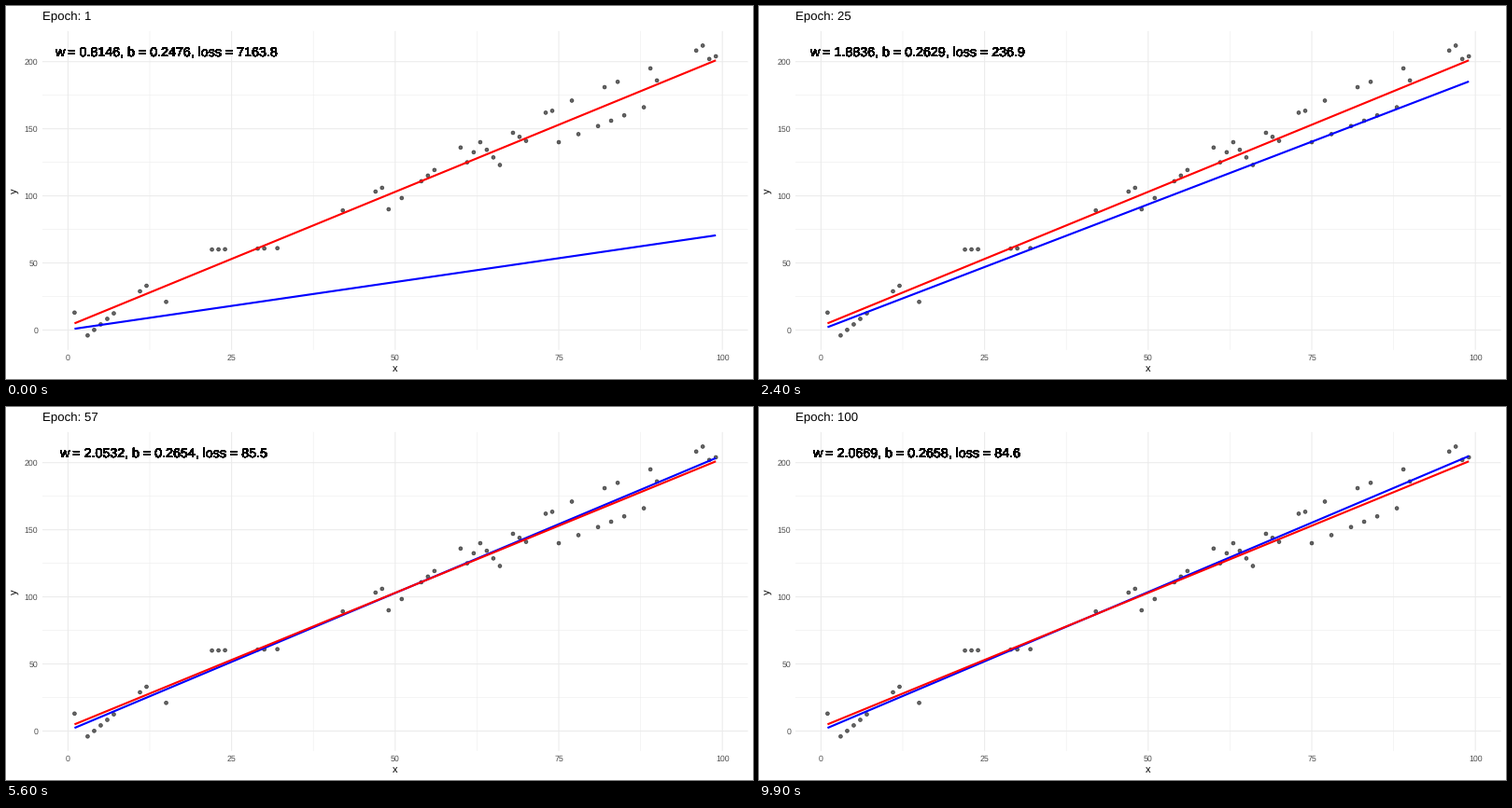
A matplotlib script for the animation above (10000 ms loop, 800 px wide and 400 px high).

```python
import numpy as np
import matplotlib.pyplot as plt
from matplotlib.animation import FuncAnimation
from matplotlib.patches import Circle

EPOCHS = 100
RATE = 1e-5
BEST_W, BEST_B, MIN_LOSS = 2.05466, 1.1632, 84.381  # least-squares optimum
PT = 0.72  # points per pixel at 100 dpi
LEFT, RIGHT, TOP, BOTTOM = 39.0, 794.5, 26.9, 368.8

X = np.r_[1, 3:8, 11:13, 15, 22:25, 29:31, 32, 42, 47:50, 51, 54:57, 60:67,
          68:71, 73:76, 77:79, 81:86, 88:91, 96:100]


def px(x):
    return 66.4 + 7.008 * x


def py(y):
    return 347.5 - 1.439 * y


def true_line(x):
    return 2 * x + 3


def noise(x):
    """Slow swings from key points, then a tight zigzag near the right end."""
    at, swing = zip((1, 8), (3, -13), (12, 6), (15, -12), (22, 13), (32, -6),
                    (48, 7), (49, -11), (60, 13), (61, 0), (63, 11),
                    (66, -12), (68, 8), (70, -2), (73, 13), (90, 3),
                    (97, 15), (98, 3))
    zigzag = np.where(np.isin(x % 5, (2, 4)), 14, -13)
    return np.where((x >= 75) & (x < 90), zigzag, np.interp(x, at, swing))


def descend(w, b):
    """Gradient descent on squared error; one entry per epoch."""
    steps = []
    for _ in range(EPOCHS):
        gap = (BEST_W - w) * X + (BEST_B - b)
        line = (w, b)
        w += 2 * RATE * np.mean(gap * X)
        b += 2 * RATE * np.mean(gap)
        steps.append((line, w, b, MIN_LOSS + np.mean(gap ** 2)))
    return steps


steps = descend(0.71033, 0.24612)
ends = np.array([X[0], X[-1]])

plt.rcParams["font.family"] = "Liberation Sans"
plt.rcParams["text.hinting"] = "no_hinting"
fig = plt.figure(figsize=(8, 4), dpi=100, facecolor="white")
ax = fig.add_axes([0, 0, 1, 1])
ax.set_xlim(0, 800)
ax.set_ylim(400, 0)
ax.axis("off")


def stroke(xs, ys, color, width, z):
    return ax.plot(xs, ys, color=color, lw=width * PT, zorder=z, snap=False,
                   solid_capstyle="butt")[0]


def label(x, y, text, size, color="black", ha="left", **kw):
    return ax.text(x, y, text, fontsize=size * PT, color=color, ha=ha,
                   va="baseline", zorder=6, **kw)


def grid(xs, ys, width, z):
    for x in xs:
        stroke([px(x)] * 2, [TOP, BOTTOM], "#ebebeb", width, z)
    for y in ys:
        stroke([LEFT, RIGHT], [py(y)] * 2, "#ebebeb", width, z)


x_ticks = range(0, 101, 25)
y_ticks = range(0, 201, 50)
grid(np.arange(12.5, 100, 25), range(25, 200, 50), 0.53, 0)
grid(x_ticks, y_ticks, 1.07, 1)

for v in x_ticks:
    label(px(v), 380.4, str(v), 8.8, "#4d4d4d", "center")
for v in y_ticks:
    label(34.2, py(v) + 3.2, str(v), 8.8, "#4d4d4d", "right")
label((LEFT + RIGHT) / 2, 391.5, "x", 11, ha="center")
label(12.3, (TOP + BOTTOM) / 2 + 0.6, "y", 11, ha="center", rotation=90,
      rotation_mode="anchor")

# Fill and outline are both translucent, so their overlap is darker.
shade = (0, 0, 0, 0.6)
for x, y in zip(X, true_line(X) + noise(X)):
    ax.add_patch(Circle((px(x), py(y)), 1.95, fc=shade, ec=shade,
                        lw=0.71 * PT, zorder=2))

fit = stroke(px(ends), py(ends), "#0000ff", 2.13, 3)
stroke(px(ends), py(true_line(ends)), "#ff0000", 2.13, 4)

title = label(LEFT, 15.2, "", 13.2)
# One copy per data point: the stacked antialiasing thickens the glyphs.
notes = [label(0, 53.6, "", 14.23) for _ in X]


def update(i):
    (w0, b0), w, b, loss = steps[i]
    fit.set_ydata(py(w0 * ends + b0))
    title.set_text(f"Epoch: {i + 1}")
    text = f"w = {round(w, 4):g}, b = {round(b, 4):g}, loss = {round(loss, 1):g}"
    for note in notes:
        note.set_text(text)
    left = px(10) - 1.2 - 0.35 * notes[0].get_window_extent().width
    for note in notes:
        note.set_x(left)
    return [fit, title, *notes]


anim = FuncAnimation(fig, update, frames=EPOCHS, interval=100, repeat=True,
                     repeat_delay=0, blit=False)
plt.show()
```
